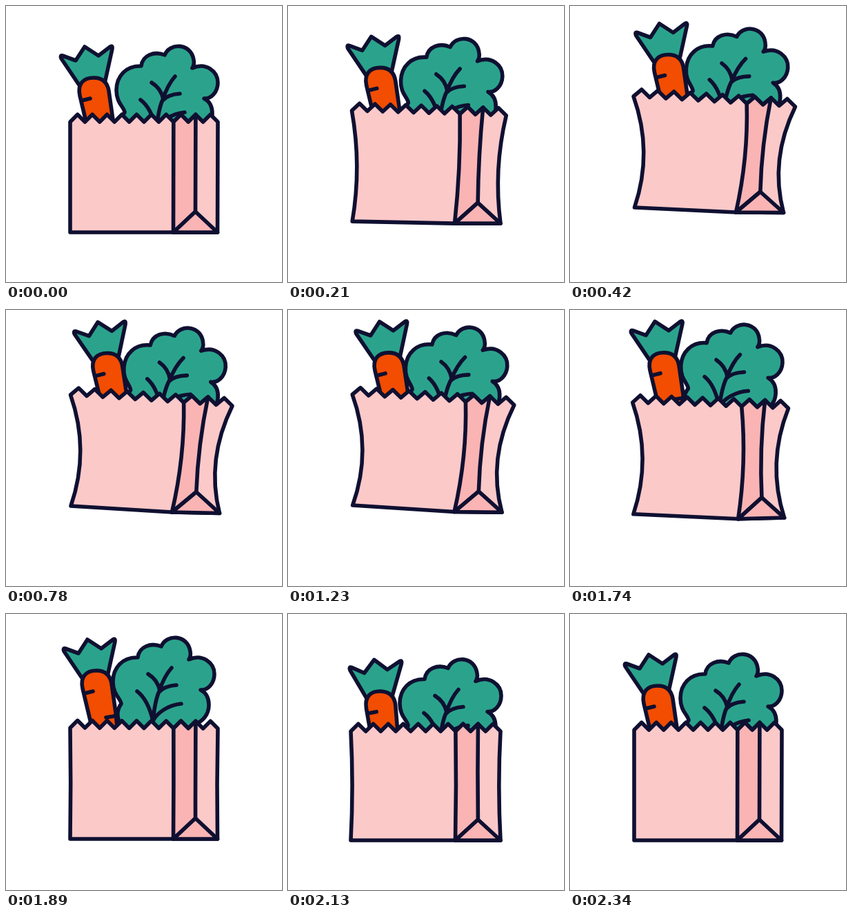
Animation, 400 px wide and 400 px high, one loop 4370 ms. Source, as an HTML page:

```html
<!DOCTYPE html>
<html lang="en">
<head>
<meta charset="utf-8">
<title>Grocery bag</title>
<style>
  html, body { margin: 0; height: 100%; overflow: hidden; background: #fff; }
  svg { display: block; width: 100vw; height: 100vh; }
  path { stroke: #0f1031; stroke-width: 5.6; stroke-linecap: round; stroke-linejoin: round; }
  .line { fill: none; }
  .leaf { fill: #2ba38c; }
  .root { fill: #f24d00; }
  .paper { fill: #fcc9c9; }
  .shade { fill: #fab4b4; }
</style>
</head>
<body>
<svg viewBox="0 0 400 400">
  <g id="broccoli">
    <path class="leaf" d="M172 186C166 176 164 165 172 154C171 146 160 141 160 122C160 102 174 86 196 87C198 71 215 65 230 71
      C237 53 268 53 272 78C273 83 272 87 270 90C290 81 307 95 307 111C307 125 297 135 287 134C297 139 299 148 299 156
      C299 170 290 180 278 184L270 215H180Z"/>
    <path class="line" d="M211 111C221 117 226 126 228 135M245 102C236 112 231 124 227 136C222 147 220 158 218 179
      M252 127C240 128 232 131 227 137M195 136C207 145 214 162 218 179C224 167 240 156 259 154"/>
  </g>
  <g id="carrot">
    <path class="leaf" d="M82 72L101 79L114 59L134 72L151 59Q155 57 154 62L143 112L107 116L80 76Q78 71 82 72Z"/>
    <path class="root" d="M128 218L107 130C103 112 113 104 127 104C140 104 147 111 149 123L155 165L160 218Z"/>
    <path class="line" d="M110 137L122 134M141 172L153 170"/>
  </g>
  <path id="bag" class="paper"/>
  <path id="gusset" class="shade"/>
  <path id="base" class="shade"/>
</svg>
<script>
const LOOP = 4370, STEP = 30;
const el = id => document.getElementById(id);

// Corners at rest: top left, top right, bottom left, bottom crease, bottom right
const REST = [93, 168, 307, 168, 93, 328, 242.5, 328, 306.5, 328];

// Offsets: five corners, pinch, carrot x y angle, broccoli x y angle
const still = Array(17).fill(0);
const lifted = [.5, -45, 21, -29, 1, -44, -2, -35, 3, -33.5, 1, 19.5, -41.5, -.5, 11.5, -33.5, 4];
const KEYS = [
  [0, still],
  [420, [-1, -37, 19.5, -22, .5, -36, -2, -29, 3, -28.5, 1, 15.5, -33.5, 0, 9, -26.5, 4]],
  [720, lifted],
  [1080, lifted],
  [1530, [-1.5, -48.5, 19.5, -36, -1, -50, 1, -38, 6, -41, 1.2, 15.5, -46, 0, 8.5, -39.5, 4]],
  [1620, [-4, -51, 18, -38, -2, -52, 2, -40, 7, -43, 1.3, 14, -49, 0, 7, -42, 4]],
  [1890, [0, -3, 0, -2, 0, -2, 0, -2, 0, -2, .05, 4, -22, 0, -5, -24, 0]],
  [1990, [-1, 4, 1, 4, 0, 0, 0, 0, 0, 0, -1.42, 7, 12, 2, 1, 12, 0]],
  [2130, [-2, 2, 1, 2, -2, 0, 0, 0, 1.5, 0, .15, 8, 8, 3.5, 2, 7.5, 0]],
  [2250, [0, 0, 0, 0, 0, 0, 0, 0, 0, 0, 0, 0, -3, 0, 0, -3, 0]],
  [2340, still]
];

const rate = (i, j) => (KEYS[i + 1][1][j] - KEYS[i][1][j]) / (KEYS[i + 1][0] - KEYS[i][0]);

// Monotone slope: flat at both ends and at turning points
function slope(i, j) {
  if (i === 0 || i === KEYS.length - 1) return 0;
  const a = rate(i - 1, j), b = rate(i, j);
  return a * b <= 0 ? 0 : 2 * a * b / (a + b);
}

function poseAt(t) {
  const n = KEYS.findIndex(k => k[0] > t);
  if (n < 0) return still;
  const i = n - 1, [t0, from] = KEYS[i], [t1, to] = KEYS[n];
  const h = t1 - t0, u = (t - t0) / h, v = 1 - u;
  return from.map((p, j) =>
    p * v * v * (1 + 2 * u) + to[j] * u * u * (3 - 2 * u) +
    h * u * v * (slope(i, j) * v - slope(n, j) * u));
}

const poly = points => points.map(p => p.join(" ")).join("L");

// Curve from a to b whose middle is pushed sideways
const bend = (a, b, push) =>
  `Q${(a[0] + b[0]) / 2 + 2 * push} ${(a[1] + b[1]) / 2} ${b.join(" ")}`;

function place(id, x, y, angle, cx, cy) {
  el(id).setAttribute("transform", `translate(${x} ${y}) rotate(${angle} ${cx} ${cy})`);
}

function draw(t) {
  const pose = poseAt(t);
  const c = REST.map((p, j) => p + pose[j]);
  const [tl, tr, bl, crease, br] = [0, 2, 4, 6, 8].map(j => [c[j], c[j + 1]]);
  const [pinch, cx, cy, ca, bx, by, ba] = pose.slice(10);
  const apex = [(crease[0] + br[0]) / 2 + pinch * .8, (crease[1] + br[1]) / 2 - 30];

  // Zigzag rim: ten teeth, a valley at each even index
  const rim = Array.from({ length: 21 }, (_, i) => [
    tl[0] + (tr[0] - tl[0]) * i / 20,
    tl[1] + (tr[1] - tl[1]) * i / 20 - (i % 2) * 10.7
  ]);

  place("carrot", cx, cy, ca, 126, 104);
  place("broccoli", bx, by, ba, 232, 110);
  el("bag").setAttribute("d",
    `M${poly(rim)}${bend(tr, br, -14.5 * pinch)}L${poly([crease, bl])}${bend(bl, tl, 14 * pinch)}Z`);
  el("gusset").setAttribute("d",
    `M${poly(rim.slice(14, 18))}${bend(rim[17], apex, -3 * pinch)}L${crease.join(" ")}${bend(crease, rim[14], 5 * pinch)}Z`);
  el("base").setAttribute("d", `M${poly([crease, apex, br])}Z`);
}

const start = performance.now();
function tick() {
  const t = (performance.now() - start) % LOOP;
  draw(Math.floor(t / STEP) * STEP);
  requestAnimationFrame(tick);
}
tick();
</script>
</body>
</html>
```
